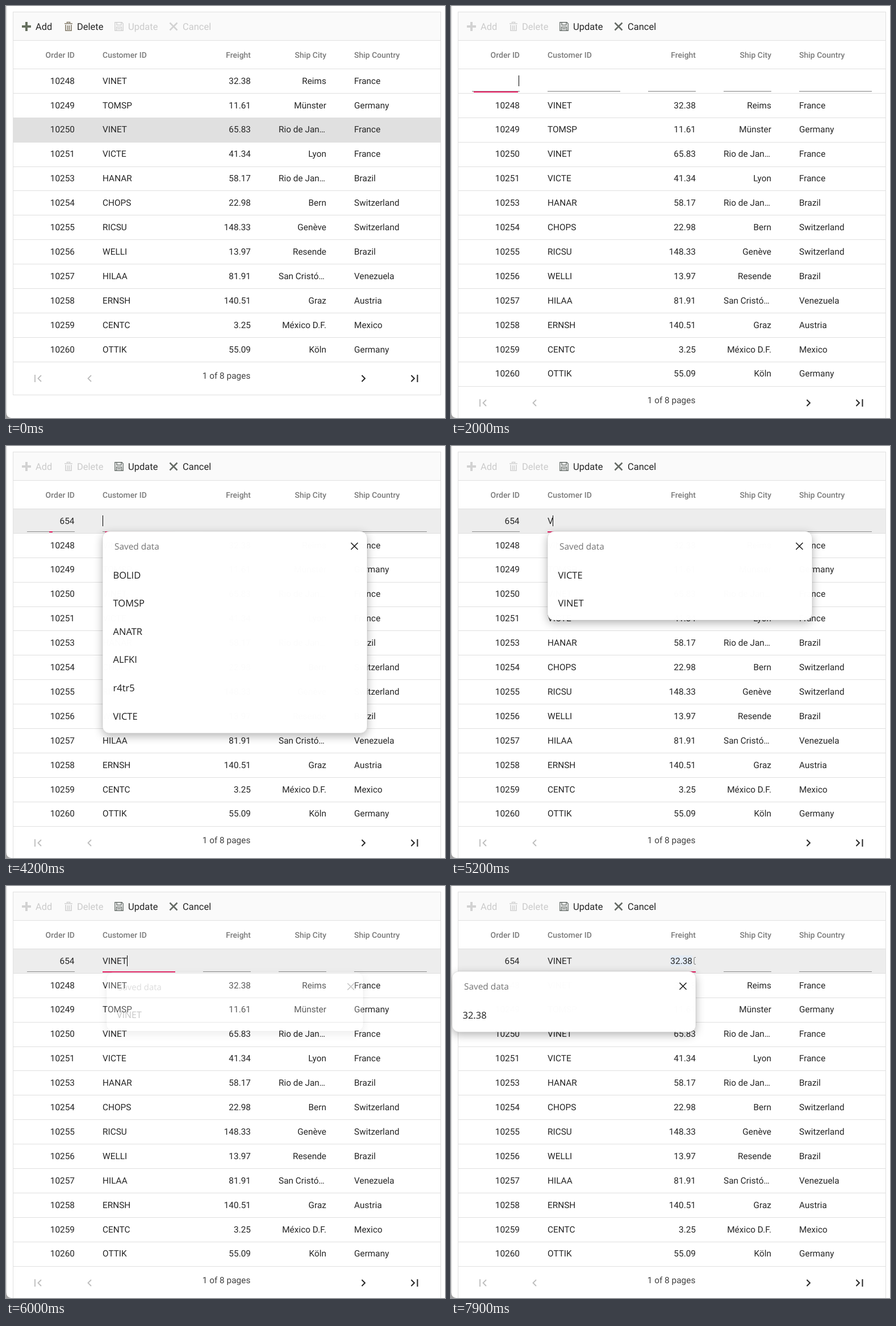
Recreate the animation shown at these times as an HTML page with a canvas. Size 773 by 724 pixels, loop 8000 ms.

```html
<!DOCTYPE html>
<html lang="en">
<head>
<meta charset="utf-8">
<title>Editable order grid</title>
<style>
html, body { margin: 0; width: 100%; height: 100%; overflow: hidden; background: #fff; }
canvas { display: block; }
</style>
</head>
<body>
<canvas id="stage" width="773" height="724"></canvas>
<script>
const ctx = document.getElementById('stage').getContext('2d');
ctx.textRendering = 'geometricPrecision';
const LOOP = 8000, ROW = 42.9, TOP = 109.9;
const INK = '#262626', MUTED = '#7b7b7b', OFF = '#cbcbcb', LINE = '#e0e0e0', RED = '#e3165b';
const BODY = '15.4px Roboto, sans-serif';
const HEAD = '500 14px Roboto, sans-serif';
const TOOL = '16.5px Roboto, sans-serif';

const columns = [
  { title: 'Order ID', left: 37, right: 121, align: 'right' },
  { title: 'Customer ID', left: 170, right: 298, align: 'left' },
  { title: 'Freight', left: 347, right: 431, align: 'right' },
  { title: 'Ship City', left: 480, right: 564, align: 'right' },
  { title: 'Ship Country', left: 613, right: 741, align: 'left' },
];

const rows = `10248|VINET|32.38|Reims|France
10249|TOMSP|11.61|Münster|Germany
10250|VINET|65.83|Rio de Jan…|France
10251|VICTE|41.34|Lyon|France
10253|HANAR|58.17|Rio de Jan…|Brazil
10254|CHOPS|22.98|Bern|Switzerland
10255|RICSU|148.33|Genève|Switzerland
10256|WELLI|13.97|Resende|Brazil
10257|HILAA|81.91|San Cristó…|Venezuela
10258|ERNSH|140.51|Graz|Austria
10259|CENTC|3.25|México D.F.|Mexico
10260|OTTIK|55.09|Köln|Germany`.split('\n').map(line => line.split('|'));

const saved = ['BOLID', 'TOMSP', 'ANATR', 'ALFKI', 'r4tr5', 'VICTE'];

function rect(x, y, w, h, color) {
  ctx.fillStyle = color;
  ctx.fillRect(x, y, w, h);
}

function text(str, x, y, font, color, align = 'left') {
  ctx.font = font;
  ctx.textAlign = align;
  ctx.fillStyle = color;
  ctx.fillText(str, x, y);
}

function stroke(d, color, width) {
  ctx.strokeStyle = color;
  ctx.lineWidth = width;
  ctx.stroke(new Path2D(d));
}

function roundBox(x, y, w, h, r, color) {
  ctx.beginPath();
  ctx.roundRect(x, y, w, h, r);
  ctx.fillStyle = color;
  ctx.fill();
}

// Last entry of [[time, value], ...] already reached
const at = (steps, t) => steps.reduce((value, [time, next]) => t >= time ? next : value, steps[0][1]);

// Share of a focus underline that has grown since the field was entered
const grown = (t, start) => t < start ? 0 : [.4, .93][(t - start) / 100] ?? 1;

const typed = (word, times, t) => word.slice(0, times.filter(time => t >= time).length);

function toolbar(t, editing) {
  rect(13, 11, 752, 49, '#fafafa');
  rect(13, 60, 752, 1, LINE);
  if (t >= 800 && t < 1000) roundBox(93, 21, 82, 29, 4, '#e0e0e0');
  if (t >= 1000 && !editing) roundBox(19.5, 21, 65, 29, 4, t < 1800 ? '#e0e0e0' : '#dcdcdc');

  const idle = editing ? '#d2d2d2' : null, busy = editing ? null : '#d2d2d2';
  stroke('M36 28V44M28 36H44', idle || '#66705f', 4);
  stroke('M103 31H117M107.5 30V28.5H112.5V30M105 33V43.2H115V33M108.5 34V42M111.5 34V42', idle || '#827a68', 1.6);
  stroke('M191.8 28.8H204L206.2 31V43.2H191.8ZM195 29V33.5H203V29M194.5 43V37H203.5V43M196 40H202', busy || '#69706c', 1.4);
  stroke('M288.5 29.5L301.5 42.5M301.5 29.5L288.5 42.5', busy || '#656b65', 2.6);
  const labels = [['Add', 52], ['Delete', 125], ['Update', 215], ['Cancel', 311]];
  labels.forEach(([label, x], i) => text(label, x, 42, TOOL, (i < 2) === editing ? OFF : INK));
}

function cells(values, slot) {
  const y = Math.floor(137.1 + ROW * slot);
  columns.forEach((col, i) => {
    const align = values[i].endsWith('…') ? 'left' : col.align;
    text(values[i], align === 'left' ? col.left : col.right, y, BODY, INK, align);
  });
}

function pager(dy) {
  ctx.save();
  ctx.translate(0, dy);
  stroke('M51 648V661M62 649L56.5 654.5L62 660', '#bdbdbd', 1.8);
  stroke('M150 649L144.5 654.5L150 660', '#bdbdbd', 1.8);
  stroke('M626.5 649L632 654.5L626.5 660', INK, 2);
  stroke('M713.5 649L719 654.5L713.5 660M724.5 648V661', INK, 2);
  text('1 of 8 pages', 388, 655, BODY, '#424242', 'center');
  ctx.restore();
}

function underline(col, share, hovered) {
  const full = col.right - col.left, w = full * share;
  if (hovered) rect(col.left, 150, full, 1, '#8c8c8c');
  else rect(col.left, 149, full, 2, '#b8b8b8');
  if (share) rect((col.left + col.right - w) / 2, 150, w, 2, RED);
}

function caret(x) {
  rect(x, 122, 1, 19, '#000');
}

function form(t) {
  const hovered = t >= 3900;
  if (hovered) rect(13, 111, 752, 42, '#ededed');
  const entered = [grown(t, 1900), grown(t, 4100), grown(t, 6700)];
  columns.forEach((col, i) => underline(col, (entered[i] || 0) - (entered[i + 1] || 0), hovered));

  const order = typed('654', [2800, 3000, 3200], t);
  const customer = typed('VINET', [5100, 5300, 5400, 5700, 5900], t);
  text(order, 120.5, 137, BODY, INK, 'right');
  text(customer, 170, 137, BODY, INK);
  if (t >= 7900) {
    rect(386, 122, 39, 19, '#e3ebf5');
    text('32.38', 425, 137, BODY, INK, 'right');
    stroke('M431 125.5H429Q428 125.5 428 127V136Q428 137.5 429 137.5H431', '#777', 1);
  }

  const blink = [[0, true], [2400, false], [2800, true], [3700, false], [4100, true], [4600, false],
    [5100, true], [6400, false], [6700, true], [7200, false], [7600, true], [7900, false]];
  if (!at(blink, t)) return;
  ctx.font = BODY;
  if (t < 4100) caret(119);
  else if (t < 6700) caret(170 + Math.floor(ctx.measureText(customer).width));
  else caret(429.5);
}

function popup(x, right, items, shown) {
  const y = 150, w = right - x, h = 106.5 + 49.6 * (items.length - 1);
  const scale = shown < 1 ? .97 : 1;
  ctx.save();
  ctx.globalAlpha = shown;
  ctx.translate(x + w / 2, y + h / 2);
  ctx.scale(scale, scale);
  ctx.translate(-x - w / 2, -y - h / 2);

  // The shadow is kept outside the box so that a fading popup stays white
  ctx.save();
  ctx.beginPath();
  ctx.rect(x - 50, y - 50, w + 100, h + 100);
  ctx.roundRect(x, y, w, h, 12);
  ctx.clip('evenodd');
  ctx.shadowColor = 'rgba(0,0,0,.3)';
  ctx.shadowBlur = 16;
  ctx.shadowOffsetY = 5;
  roundBox(x, y, w, h, 12, '#fff');
  ctx.restore();

  roundBox(x, y, w, h, 12, 'rgba(255,255,255,.99)');
  ctx.strokeStyle = 'rgba(0,0,0,.1)';
  ctx.lineWidth = 1;
  ctx.stroke();
  text('Saved data', x + 21, 182, '15.4px "Open Sans", sans-serif', '#737373');
  items.forEach((item, i) => text(item, x + 18.5, Math.round(232.5 + 49.6 * i), '16.5px "Open Sans", sans-serif', '#1b1b1b'));
  const cx = right - 22.5;
  stroke(`M${cx - 6} 170L${cx + 6} 182M${cx + 6} 170L${cx - 6} 182`, '#1b1b1b', 1.6);
  ctx.restore();
}

function draw(t) {
  const editing = t >= 1900, shift = editing ? 1 : 0;
  rect(0, 0, 773, 724, '#fff');
  rect(0, 0, 1.5, 724, '#dcdcdc');
  ctx.fillStyle = '#a0a0a0';
  ctx.fill(new Path2D('M0 714Q1 723 9 724H0Z'));

  ctx.strokeStyle = LINE;
  ctx.lineWidth = 1;
  ctx.strokeRect(12.5, 10.5, 753, 673 + shift * 43);
  if (editing) {
    rect(13, 715, 752, 9, '#fff');
    rect(12, 715, 1, 9, LINE);
    rect(765, 715, 1, 9, LINE);
  }
  toolbar(t, editing);
  columns.forEach(c => text(c.title, c.align === 'left' ? c.left : c.right, 91, HEAD, MUTED, c.align));

  if (!editing) rect(13, 196, 752, 43, LINE);
  for (let k = 0; k <= rows.length + shift; k++) rect(13, Math.round(TOP + ROW * k), 752, 1, LINE);
  rows.forEach((values, i) => cells(values, i + shift));
  pager(shift * 43);
  if (!editing) return;

  form(t);
  if (t >= 4100 && t < 6100) {
    const items = at([[0, saved], [5200, ['VICTE', 'VINET']], [5500, ['VINET']]], t);
    popup(170, 636, items, at([[0, .25], [4200, 1], [6000, .25]], t));
  }
  if (t >= 7800) popup(2, 431, ['32.38'], t < 7900 ? .25 : 1);
}

function tick(now) {
  draw(Math.floor(now % LOOP / 100) * 100);
  requestAnimationFrame(tick);
}
requestAnimationFrame(tick);
</script>
</body>
</html>
```
